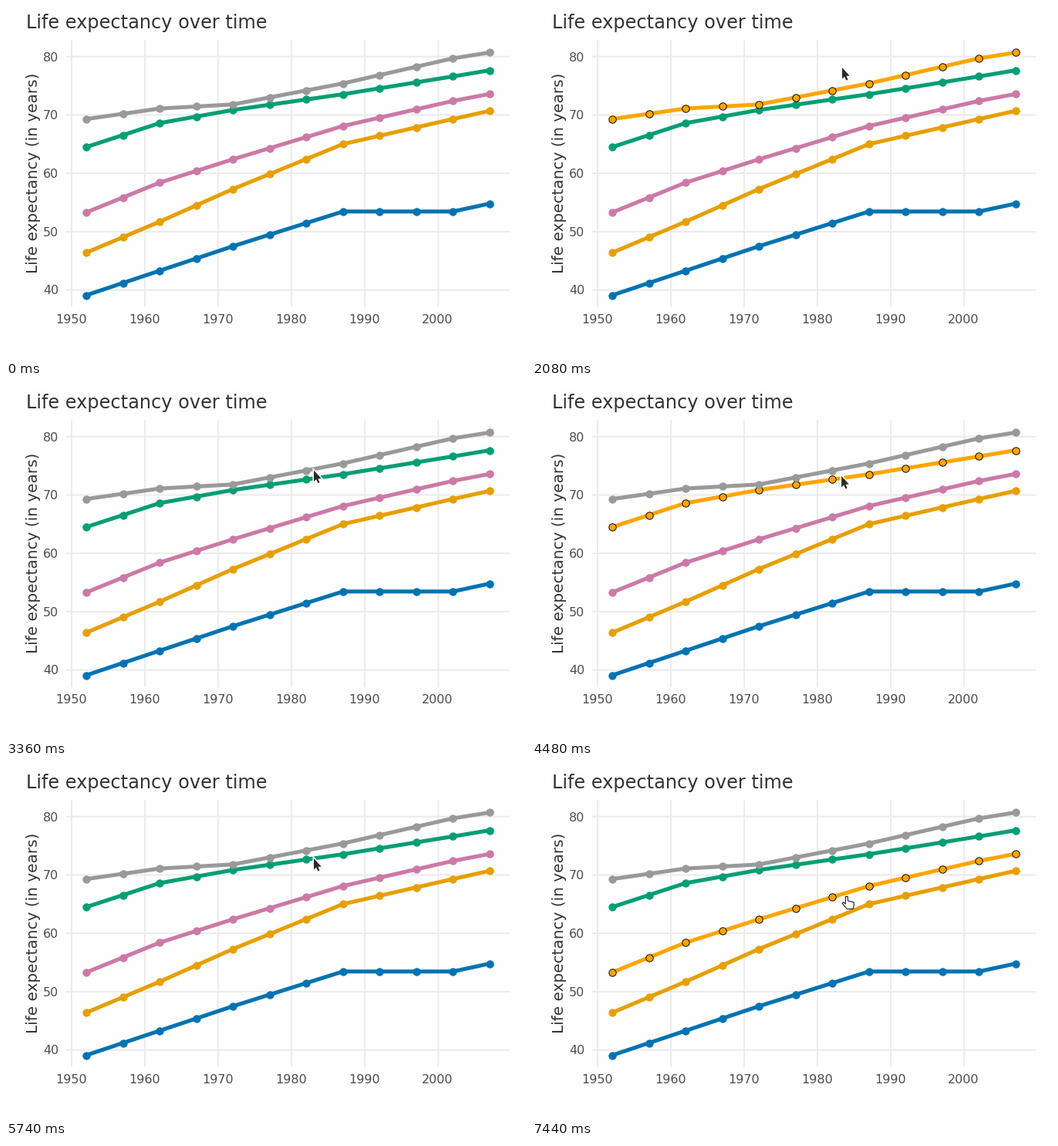
Animation, 674 px wide and 457 px high, one loop 8000 ms. Source, as a matplotlib script:

```python
import numpy as np
import matplotlib.pyplot as plt
from matplotlib.animation import FuncAnimation
from matplotlib.patches import Polygon
from matplotlib.patheffects import withStroke

W, H, DPI = 674, 457, 100
STEP, LOOP = 20, 8000
PT = 72 / DPI  # points per pixel
FONT = 20      # base text size in pixels
INK, HOT = "#2A2A2A", "#FFA500"

plt.rcParams["font.family"] = "DejaVu Sans"

# Each curve bends at the key years and is straight between them.
YEARS = np.arange(1952, 2008, 5)
KEY_YEARS = [1952, 1962, 1972, 1987, 2002, 2007]
SERIES = [
    ("#0072B2", [39.1, 43.3, 47.5, 53.45, 53.45, 54.8]),
    ("#CC79A7", [53.3, 58.4, 62.4, 68.1, 72.4, 73.6]),
    ("#E69F00", [46.4, 51.7, 57.3, 65.0, 69.3, 70.7]),
    ("#009E73", [64.5, 68.6, 70.85, 73.55, 76.6, 77.65]),
    ("#999999", [69.3, 71.1, 71.8, 75.4, 79.7, 80.7]),
]

# Hovered curve as (start, end, series), from grey down to pink.
HOVERS = [(2080, 3220, 4), (4480, 5620, 3), (6840, LOOP, 1)]

# The pointer glides through (time, x, y) but is only seen every TICK ms.
APPEAR, TICK = 1520, 140
PATH = np.array([
    (1680, 408, 43), (1820, 402, 80), (1960, 402, 80), (2100, 407, 100),
    (3360, 399, 109.5), (4060, 399, 116), (5460, 406, 119),
    (5740, 399, 120), (5880, 402, 134), (6300, 404, 156),
    (6860, 402, 160), (7420, 408, 169),
]).T

# Cursor outlines around their hot spots.
ARROW = np.array([(0, 0), (0, 14.5), (3.1, 11.7), (5.3, 16.6),
                  (7.5, 15.7), (5.4, 10.9), (9.7, 10.6)])
HAND = np.array([(-1.6, 10), (-1.6, 0.6), (1.4, 0.6), (1.4, 6), (9.2, 8),
                 (9.2, 12.5), (8, 16.6), (0.2, 16.6), (-6, 9.2),
                 (-4.4, 7.8)])


def px(year):
    return 85 + (year - 1950) * 9.504


def py(age):
    return 65.7 + (80 - age) * 7.575


def hovered(t):
    return next((s for start, end, s in HOVERS if start <= t < end), None)


def pointer(t):
    seen = t - (t - APPEAR - STEP) % TICK
    return [np.interp(seen, PATH[0], axis) for axis in PATH[1:]]


fig = plt.figure(figsize=(W / DPI, H / DPI), dpi=DPI, facecolor="#FEFEFE")
ax = fig.add_axes([0, 0, 1, 1])
ax.set(xlim=(0, W), ylim=(H, 0))
ax.axis("off")


def label(x, y, text, scale, color, **kw):
    ax.text(x, y, text, size=FONT * scale * PT, color=color,
            va="baseline", **kw)


def grid_line(xs, ys):
    ax.plot(xs, ys, color="#EBEBEB", lw=1.94 * PT, snap=False,
            solid_capstyle="butt", zorder=1)


for age in range(40, 81, 10):
    grid_line((px(1949.25), px(2009.75)), (py(age), py(age)))
    label(68.4, py(age) + 5.8, str(age), 0.8, "#4D4D4D", ha="right")
for year in range(1950, 2001, 10):
    grid_line((px(year), px(year)), (44.4, 391))
    label(px(year) - 0.8, 412.3, str(year), 0.8, "#4D4D4D", ha="center")

label(25.6, 29, "Life expectancy over time", 1.2, "#333333", ha="left")
label(41, 216.5, "Life expectancy (in years)", 1, "#333333", ha="center",
      rotation=90, rotation_mode="anchor")

lines, dots = [], []
for color, ages in SERIES:
    xs, ys = px(YEARS), py(np.interp(YEARS, KEY_YEARS, ages))
    lines += ax.plot(xs, ys, color=color, lw=5.1 * PT, zorder=2,
                     solid_joinstyle="round", solid_capstyle="butt")
    dots.append(ax.scatter(xs, ys, s=(9.4 * PT) ** 2, color=color,
                           linewidths=0.94 * PT, zorder=3))

arrow = ax.add_patch(Polygon(
    ARROW, fc=INK, ec="none", zorder=5,
    path_effects=[withStroke(linewidth=3 * PT, foreground="white")]))
hand = ax.add_patch(Polygon(
    HAND, fc="white", ec=INK, lw=1.2 * PT, joinstyle="round", zorder=5))


def draw(frame):
    t = frame * STEP
    hot = hovered(t)
    for i, (color, _) in enumerate(SERIES):
        lines[i].set_color(HOT if i == hot else color)
        dots[i].set_facecolor(HOT if i == hot else color)
        dots[i].set_edgecolor("black" if i == hot else color)

    # The cursor changes one step after the curve does.
    pointing = hovered(t - STEP) is not None
    spot = pointer(t)
    arrow.set_visible(t >= APPEAR and not pointing)
    hand.set_visible(pointing)
    arrow.set_xy(ARROW + spot)
    hand.set_xy(HAND + spot)
    return [*lines, *dots, arrow, hand]


anim = FuncAnimation(fig, draw, frames=LOOP // STEP, interval=STEP,
                     repeat=True, repeat_delay=0)
plt.show()
```
